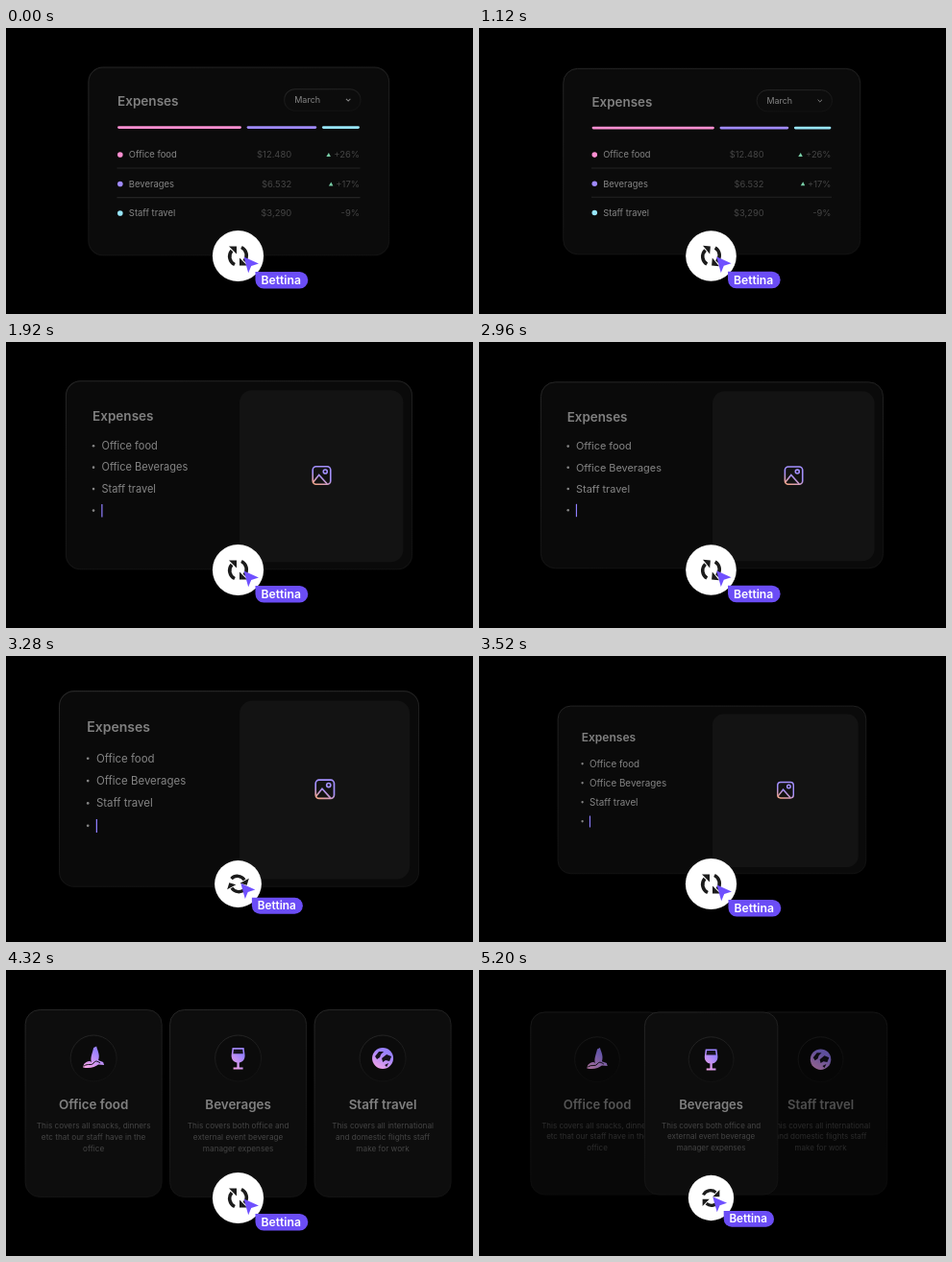
Animation, 486 px wide and 298 px high, one loop 5280 ms. Source, as an HTML page:

```html
<!DOCTYPE html>
<html lang="en">
<head>
<meta charset="utf-8">
<title>Expenses</title>
<style>
  html, body { margin: 0; width: 100%; height: 100%; overflow: hidden; background: #000; }
  svg { display: block; width: 486px; height: 298px; font-family: Inter, sans-serif; }
  .title { font-weight: 600; fill: #808080; }
  .label { fill: #858585; }
  .dim { fill: #454545; }
  .end { text-anchor: end; }
  .mid { text-anchor: middle; }
</style>
</head>
<body>
<svg viewBox="0 0 486 298">
  <defs>
    <linearGradient id="edge" x2=".3" y2="1">
      <stop stop-color="#262626"/><stop offset="1" stop-color="#121212"/>
    </linearGradient>
    <linearGradient id="tint" x1=".8" x2=".2" y2="1">
      <stop offset=".25" stop-color="#9a82ff"/><stop offset="1" stop-color="#f3a3e6"/>
    </linearGradient>
    <linearGradient id="warm" x1="332" y1="130" x2="324" y2="149" gradientUnits="userSpaceOnUse">
      <stop offset=".5" stop-color="#a490ff"/><stop offset="1" stop-color="#f0a48c"/>
    </linearGradient>
  </defs>

  <g id="table">
    <rect x="86.5" y="41.5" width="311.5" height="195" rx="15" fill="#0b0b0b" stroke="url(#edge)"/>
    <text class="title" x="116.5" y="81.2" font-size="13.5">Expenses</text>
    <rect x="289.5" y="64" width="79" height="22.5" rx="11.2" fill="#0c0c0c" stroke="url(#edge)"/>
    <text class="label" x="300" y="78.3" font-size="9">March</text>
    <path d="M353.5 74.2l2.2 2.2 2.2-2.2" fill="none" stroke="#858585"/>
    <path d="M116 146h252M116 176.5h252" stroke="#242424"/>
    <g id="rows" font-size="9.4"></g>
  </g>

  <g id="list">
    <rect x="63" y="41" width="359" height="195.5" rx="15" fill="#0a0a0a" stroke="url(#edge)"/>
    <rect x="243" y="50.5" width="170" height="178.5" rx="13" fill="#131313"/>
    <text class="title" x="90.5" y="82" font-size="13.5">Expenses</text>
    <g id="items" class="label" font-size="11"></g>
    <path d="M100.3 169v13.5" stroke="#8f7fff" stroke-width="1.2"/>
    <g fill="none" stroke="url(#warm)" stroke-width="1.6">
      <rect x="319" y="129.8" width="18.5" height="18.5" rx="3.5"/>
      <circle cx="332" cy="135" r="2"/>
      <path d="M319.5 146l6-7.5 8.5 9.5"/>
    </g>
  </g>

  <g id="cards"></g>

  <g id="button">
    <circle r="26.6" fill="#fff"/>
    <g id="arrows" fill="#1b1b1b"></g>
  </g>
  <g id="pointer">
    <path d="M247.5 238.5l15.5 7-7.8 2.5-3 7.3z" fill="#6f50ff"/>
    <path d="M259.5 254h46a8.8 8.8 0 0 1 0 17.6h-37.2a8.8 8.8 0 0 1-8.8-8.8z" fill="#6b4df6"/>
    <text x="265.5" y="267" font-size="12.2" font-weight="600" fill="#fff">Bettina</text>
  </g>
</svg>
<script>
const $ = id => document.getElementById(id);
const LOOP = 5280, STEP = 80, TO_LIST = 1080, TO_CARDS = 2920, TO_TABLE = 4920, SWAP = 640;

// label, amount, change, colour, bar start, bar end
const expenses = [
  ['Office food', '$12.480', '+26%', '#ff8fd2', 118, 243.5],
  ['Beverages', '$6.532', '+17%', '#a08aff', 252, 321.5],
  ['Staff travel', '$3,290', '-9%', '#97e6fb', 330, 366],
];
$('rows').innerHTML = expenses.map(([name, sum, change, color, from, to], i) => {
  const y = 132 + i * 30.4;
  const rise = change[0] === '+' ? `<path d="M${333 + i * 2.5} ${y + 2}h4.5l-2-4z" fill="#79cfa8"/>` : '';
  return `<path d="M${from} 103.7H${to}" stroke="${color}" stroke-width="2.8" stroke-linecap="round"/>
    <circle cx="119.3" cy="${y}" r="2.8" fill="${color}"/>
    <text class="label" x="128.3" y="${y + 3.4}">${name}</text>
    <text class="dim end" x="297" y="${y + 3.4}">${sum}</text>${rise}
    <text class="dim end" x="367.5" y="${y + 3.4}">${change}</text>`;
}).join('');

$('items').innerHTML = ['Office food', 'Office Beverages', 'Staff travel', ''].map((name, i) => {
  const y = 108.3 + i * 22.4;
  return `<circle cx="91.5" cy="${y}" r="1.3"/><text x="99.9" y="${y + 3.8}">${name}</text>`;
}).join('');

// Card contents are drawn around the card centre
const banana = `<path d="M0-11L3-12.5C4-8 7-4 5 2L10 4 11 7 5 6.5C2 9-4 11-11 9.500L-10 6C-7 3-4 2-2 4-4 0-1-6 0-11z" fill="url(#tint)"/>
  <path d="M-10 8C-6 5-2 8 0 5S4 3 7 5" fill="none" stroke="#111"/>`;
const glass = `<path d="M-6-11H6L7-3C7 2 4 4 1.2 4.500V9.500H5V11.500H-5V9.500H-1.200V4.500C-4 4-7 2-7-3z" fill="url(#tint)"/>
  <path d="M-4.600-9.300H4.600L5.200-4.700H-5.200z" fill="#17141f"/>`;
const globe = `<circle r="11" fill="url(#tint)"/>
  <path d="M-8-2L-4-7 1-7-2-4-3-1-6 1zM-1 0L4-4 9-2 7 3 3 2 0 4zM2 7L6 5 4 9z" fill="#15121c"/>`;
const cardData = [
  [-1, banana, 'Office food', ['This covers all snacks, dinners', 'etc that our staff have in the', 'office']],
  [1, globe, 'Staff travel', ['This covers all international', 'and domestic flights staff', 'make for work']],
  [0, glass, 'Beverages', ['This covers both office and', 'external event beverage', 'manager expenses']],
];
$('cards').innerHTML = cardData.map(([, icon, name, lines]) => `<g>
  <rect x="-71" y="-97.5" width="142" height="195" rx="15" fill="#0d0d0d" stroke="url(#edge)"/>
  <circle cy="-47" r="24" fill="#0b0b0b" stroke="url(#edge)"/>
  <g transform="translate(0 -47)">${icon}</g>
  <text class="title mid" y="6" font-size="13.4">${name}</text>
  ${lines.map((s, i) => `<text class="dim mid" y="${26.4 + i * 11.7}" font-size="8.2">${s}</text>`).join('')}
</g>`).join('');

const arrow = `<path d="M-3.5 9A9.3 9.3 0 0 1-6.5-5.5" fill="none" stroke="#1b1b1b" stroke-width="3.6"/>
  <path d="M-9.5-10H-1.5V-2z"/>`;
$('arrows').innerHTML = `${arrow}<g transform="rotate(180)">${arrow}</g>`;

// Eased value through [time, value] keys
function track(t, keys) {
  if (t <= keys[0][0]) return keys[0][1];
  for (let i = 1; i < keys.length; i++) {
    const [a, u] = keys[i - 1], [b, v] = keys[i];
    if (t < b) return u + (v - u) * (1 - Math.cos(Math.PI * (t - a) / (b - a))) / 2;
  }
  return keys[keys.length - 1][1];
}
const leave = [[0, 1], [40, .992], [200, .965], [400, 1.05], [600, .893], [640, .86]];
const enter = [[640, .86], [760, 1.02], [840, 1.003], [1000, .998], [1160, 1]];
const press = [[0, 1], [40, .99], [280, .89], [520, 1]];
const turn = [[0, 0], [40, 5], [280, 90], [560, 180]];
const fanOut = [[640, .1], [880, .9], [1040, 1.02], [1440, 1]];
const cardsIn = [[640, .88], [800, 1.03], [1000, 1]];
const fanIn = [[0, 1], [40, .99], [400, .7]];
const cardsOut = [[0, 1], [40, .995], [280, .975]];
const STAGGER = 14;

const scaleAt = (x, y, s) => `translate(${x} ${y}) scale(${s}) translate(${-x} ${-y})`;

function show(id, visible, scale) {
  $(id).style.display = visible ? '' : 'none';
  if (scale) $(id).setAttribute('transform', scaleAt(242, 145, scale));
}

function draw(now) {
  const t = Math.floor(now % LOOP / STEP) * STEP;
  const a = t - TO_LIST, b = t - TO_CARDS, c = t - TO_TABLE;

  show('table', a < SWAP, a < 0 ? track(t, [[0, 1.004], [160, 1]]) : track(a, leave));
  show('list', a >= SWAP && b < SWAP, b < 0 ? track(a, enter) : track(b, leave));
  show('cards', b >= SWAP);

  const size = c < 0 ? track(b, cardsIn) : track(c, cardsOut);
  cardData.forEach(([side], i) => {
    const spread = c < 0 ? track(b, fanOut) : track(c + side * STAGGER, fanIn);
    const card = $('cards').children[i];
    card.setAttribute('transform', `translate(${241.6 + side * 150.4 * spread} 139) scale(${size})`);
    card.setAttribute('opacity', side ? Math.max(0, Math.min(1, 1 - (1 - spread) * 1.6)) : 1);
  });

  const click = c >= 0 ? c : b >= 0 ? b : a;
  const s = track(click, press);
  $('button').setAttribute('transform', `translate(241.5 237.5) scale(${s})`);
  $('arrows').setAttribute('transform', `rotate(${track(click, turn)})`);
  $('pointer').setAttribute('transform', scaleAt(153, 187, 1 - (1 - s) * .41));
}

const start = performance.now();
function loop() {
  draw(performance.now() - start);
  requestAnimationFrame(loop);
}
loop();
</script>
</body>
</html>
```
